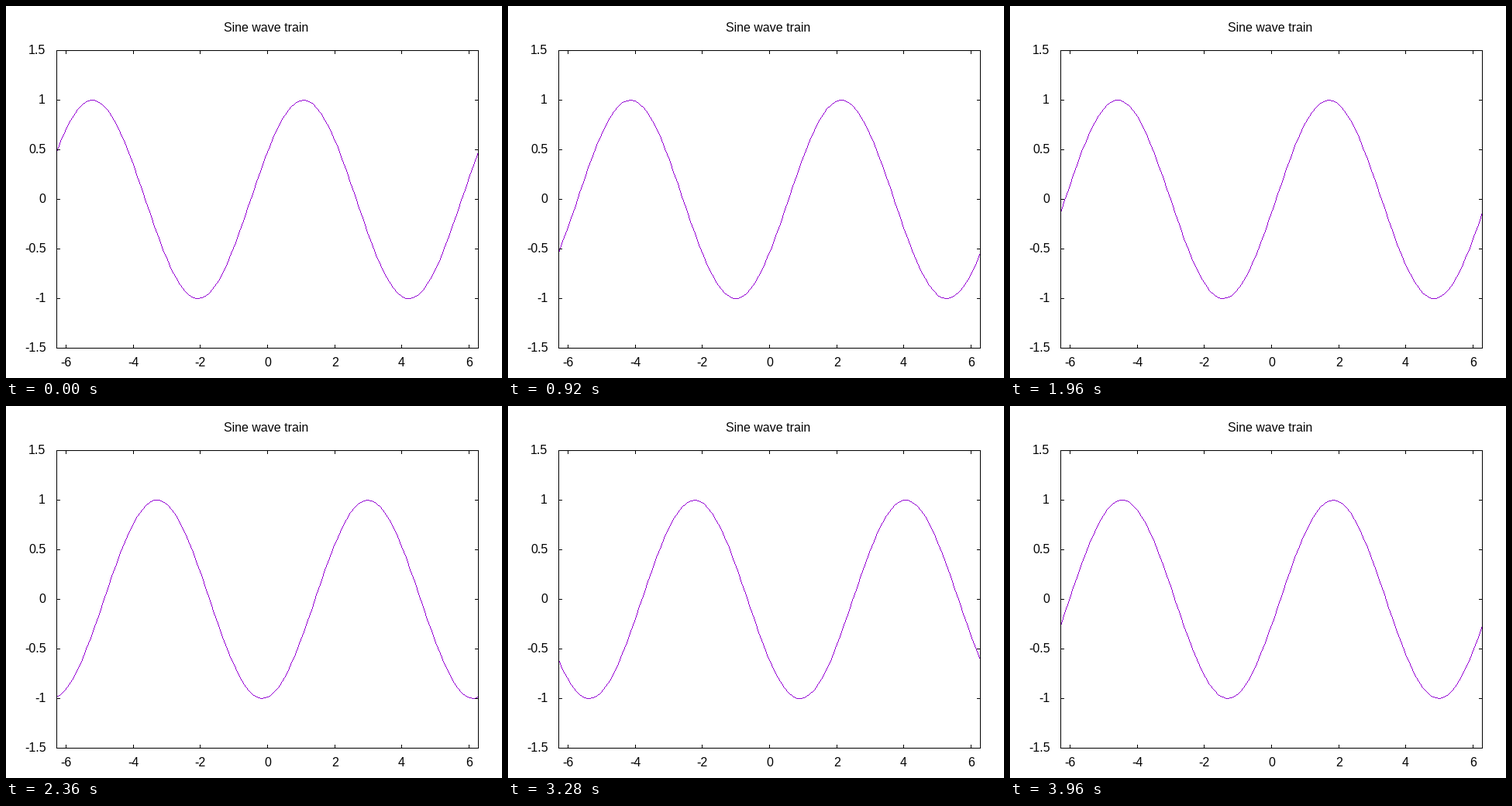
A matplotlib script for the animation above (4 s loop, 640x480 px).

```python
import math

import numpy as np
import matplotlib.pyplot as plt
from matplotlib.animation import FuncAnimation
from matplotlib.collections import PolyCollection
from matplotlib.patches import Rectangle

W, H, DPI = 640, 480, 100
LEFT, RIGHT, TOP, BOTTOM = 65, 609, 57, 441
MID, UNIT = 249, 128          # pixel row of y = 0, pixels per y unit
TIC = 4
FRAMES, INTERVAL = 100, 40
STEP = 0.5                    # phase advance per frame
SAMPLES = 100
VIOLET = "#9400d3"
ADVANCE = {"-": 5, ".": 4}    # glyph widths, digits are 9

plt.rcParams["font.family"] = "Liberation Sans"
plt.rcParams["text.hinting"] = "default"

fig = plt.figure(figsize=(W / DPI, H / DPI), dpi=DPI, facecolor="white")
ax = fig.add_axes([0, 0, 1, 1])
ax.set_xlim(0, W)
ax.set_ylim(H, 0)
ax.axis("off")


def bar(x0, y0, x1, y1):
    """Black bar covering the pixels x0..x1, y0..y1 inclusive."""
    ax.add_patch(Rectangle((x0, y0), x1 - x0 + 1, y1 - y0 + 1,
                           fc="black", lw=0, zorder=3))


def label(x, y, text):
    ax.text(x, y, text, fontsize=16 * 72 / DPI, color="black",
            ha="left", va="baseline", zorder=4)


def width(text):
    return sum(ADVANCE.get(c, 9) for c in text)


def to_col(x):
    return np.floor(LEFT + (x + 2 * np.pi) / (4 * np.pi) * (RIGHT - LEFT) + 0.5)


def to_row(y):
    return MID - np.floor(UNIT * y + 0.5)


def trace(cols, rows):
    """Pixels of a one-pixel polyline through the given points."""
    parts = []
    for x0, y0, x1, y1 in zip(cols, rows, cols[1:], rows[1:]):
        n = int(max(abs(x1 - x0), abs(y1 - y0))) + 1
        parts.append(np.column_stack([np.linspace(x0, x1, n),
                                      np.linspace(y0, y1, n)]))
    return np.floor(np.concatenate(parts) + 0.5)


# border
bar(LEFT, TOP, RIGHT, TOP)
bar(LEFT, BOTTOM, RIGHT, BOTTOM)
bar(LEFT, TOP, LEFT, BOTTOM)
bar(RIGHT, TOP, RIGHT, BOTTOM)

# tics and labels
for v in range(-6, 7, 2):
    col = int(to_col(v))
    bar(col, TOP, col, TOP + TIC)
    bar(col, BOTTOM - TIC, col, BOTTOM)
    label(math.floor(col - width(str(v)) / 2 + 0.5), 465, str(v))

for k in range(-3, 4):
    row = MID - k * UNIT // 2
    bar(LEFT, row, LEFT + TIC, row)
    bar(RIGHT - TIC, row, RIGHT, row)
    text = f"{k / 2:g}"
    label(51 - width(text), row + 5, text)

label(281, 33, "Sine wave train")

# curve
xs = np.linspace(-2 * np.pi, 2 * np.pi, SAMPLES)
cols = to_col(xs)
corners = np.array([[0, 0], [1, 0], [1, 1], [0, 1]])
curve = PolyCollection([], facecolors=VIOLET, edgecolors="none",
                       linewidths=0, antialiaseds=False, zorder=2)
ax.add_collection(curve, autolim=False)


def draw(i):
    rows = to_row(np.sin(xs + STEP * (i + 1)))
    curve.set_verts(trace(cols, rows)[:, None, :] + corners)
    return (curve,)


anim = FuncAnimation(fig, draw, frames=FRAMES, interval=INTERVAL,
                     repeat=True, repeat_delay=0, blit=False)
plt.show()
```
